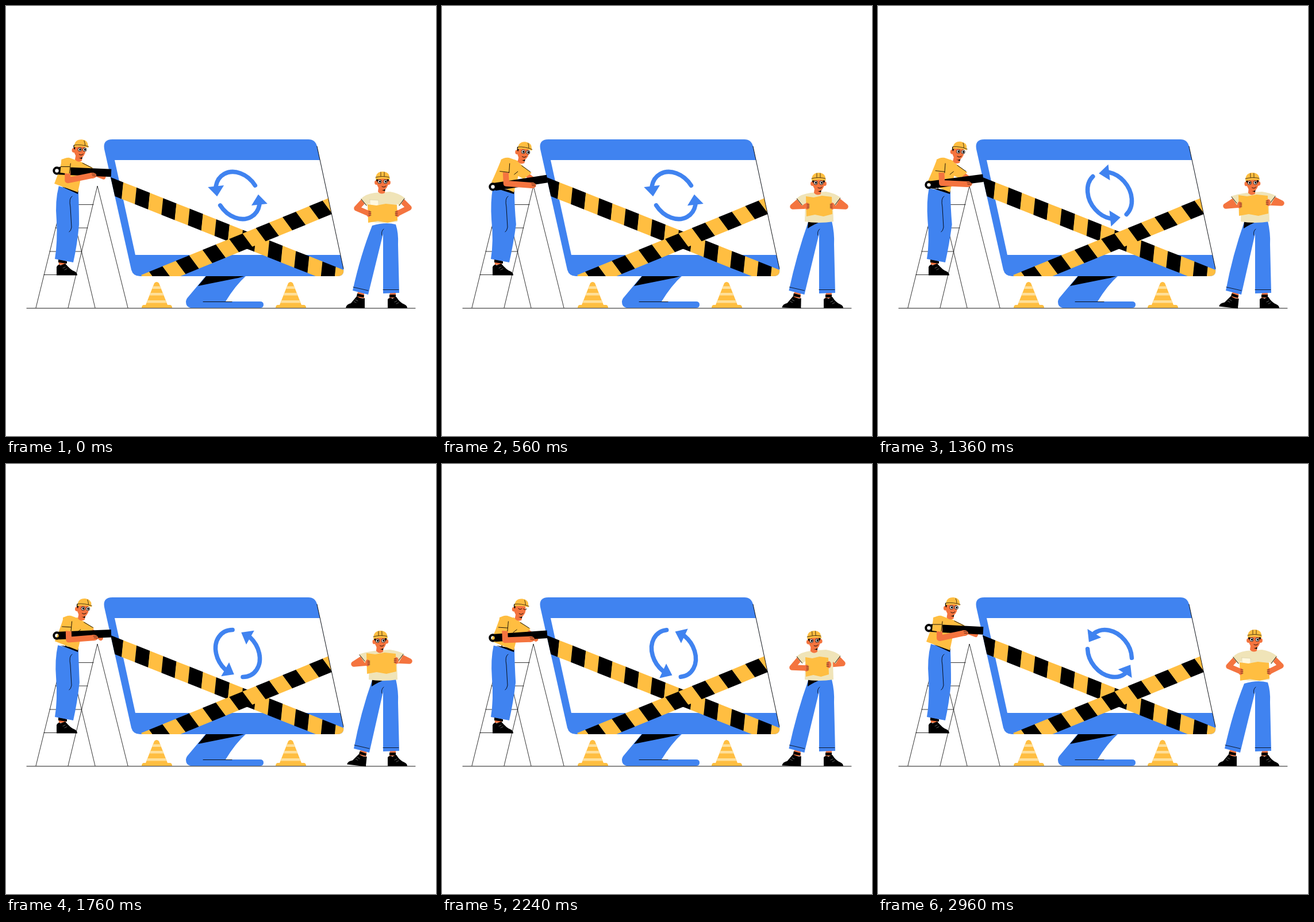
Recreate the animation shown at these times as an HTML page with a canvas. Size 748 px wide and 748 px high, loop 3040 ms.

```html
<!DOCTYPE html>
<html>
<head>
<meta charset="utf-8">
<style>
html, body { margin: 0; height: 100%; overflow: hidden; background: #fff; }
canvas { display: block; }
</style>
</head>
<body>
<canvas id="stage" width="748" height="748"></canvas>
<script>
const ctx = document.getElementById('stage').getContext('2d');
const BLUE = '#4083f0', YELLOW = '#ffbe41', PALE = '#ffe09a', CREAM = '#f0e4b8',
      SKIN = '#f4743f', INK = '#000', WHITE = '#fff', TAU = Math.PI * 2;
const MONITOR = 'M185 232H526Q538 232 541 244L587 457Q589 470 576 470H233Q221 470 218 459L171 249Q168 232 185 232Z';
const LOOP = 3040;

const mix = (a, b, q) => a + (b - a) * q;

function fill(d, color) {
  ctx.fillStyle = color;
  ctx.fill(new Path2D(d));
}
function line(d, color = INK, width = 0.9) {
  ctx.strokeStyle = color;
  ctx.lineWidth = width;
  ctx.stroke(new Path2D(d));
}
function oval(x, y, rx, ry, color) {
  ctx.fillStyle = color;
  ctx.beginPath();
  ctx.ellipse(x, y, rx, ry, 0, 0, TAU);
  ctx.fill();
}

// Barrier tape: starts at (x, y) on its top edge; (dx, dy) leads to the bottom edge.
function tape(x, y, end, slope, dx, dy, firstWidth, step, black) {
  let right = x + firstWidth;
  while (x < end) {
    right = Math.min(right, end);
    const y2 = y + (right - x) * slope;
    fill(`M${x} ${y}L${right + 0.3} ${y2}l${dx} ${dy}L${x + dx} ${y + dy}Z`, black ? INK : YELLOW);
    x = right;
    y = y2;
    right += step;
    black = !black;
  }
}

// Two arrows chase each other round a slanted circle; the heads keep their shape.
function arrows(turn) {
  const rad = Math.PI / 180, { sin, cos } = Math;
  for (const a of [157 * rad + turn, 337 * rad + turn]) {
    ctx.strokeStyle = BLUE;
    ctx.lineWidth = 7.5;
    ctx.save();
    ctx.transform(0.915, 0, 0.21, 1, 403, 329.5);
    ctx.beginPath();
    ctx.arc(0, 0, 41, 132 * rad - a, -a, true);
    ctx.restore();
    ctx.stroke();

    const b = a + 17 * rad;
    ctx.save();
    ctx.translate(403 + 37.5 * cos(a) - 8.6 * sin(a), 329.5 - 41 * sin(a));
    ctx.rotate(Math.atan2(-41 * cos(b), -37.5 * sin(b) - 8.6 * cos(b)));
    fill('M0 -14L18 0L0 14Z', BLUE);
    ctx.restore();
  }
}

function cone(x) {
  ctx.save();
  ctx.translate(x, 0);
  fill('M-4 482Q0 478 4 482L19 520H24Q27 521 27 525H-26Q-26 521 -23 520H-19Z', YELLOW);
  for (const [y, w] of [[487.5, 6.3], [499, 10.7], [512, 15.7]])
    fill(`M${-w} ${y}H${w}l1.7 4.4H${-w - 1.7}Z`, PALE);
  ctx.restore();
}

function scenery(turn) {
  line('M36 525.8H712');
  line('M52 525L104 315M108 525L159 313L212 525M155 525L104 313M66 467.5H123M76 427H132M86 386H142M96 345.5H152', INK, 0.8);

  fill('M348 469H418Q399 486 382 514H442Q448 514 448 519.5T442 525H321Q313 523 313 515Q313 510 317 506Z', BLUE);
  fill('M349 469H418L404 473L334 487Z', INK);
  line('M343 514.5H393');
  cone(262);
  cone(495);

  fill(MONITOR, BLUE);
  fill('M189 268H546L582 433H225Z', WHITE);
  arrows(turn);
  ctx.save();
  ctx.clip(new Path2D(MONITOR));
  tape(181, 297.5, 600, 0.398, -3, 29, 23, 23.1, true);
  tape(235, 468, 575, -0.41, 17, 23, 14, 23.2, false);
  ctx.restore();
  line('M541 244L587 457', INK, 0.9);
}

// Head in a hard hat; the origin is the middle of the hat.
function head(x, y, tilt, side, blink) {
  ctx.save();
  ctx.translate(x, y);
  ctx.rotate(tilt);
  const f = side ? -2 : 0;
  fill(`M${f - 6} 14L${f + 5} 18L${f + 4} 30Q${f - 3} 34 ${f - 8} 28Z`, SKIN);
  fill(`M${f - 4} 24Q${f} 26 ${f + 5} 23L${f + 4} 27Z`, INK);
  oval(f - 10.5, 12, 3.4, 4, SKIN);
  if (!side) oval(10.5, 12, 3.4, 4, SKIN);
  oval(f, 12, 10, 13, SKIN);
  fill(`M${f - 11} 3H${f - 5}L${f - 8} 7L${f - 9} 11Q${f - 12} 8 ${f - 11} 3Z`, INK);
  if (!side) fill('M11 3H7L9 11Q12 8 11 3Z', INK);
  for (const ex of side ? [-2, 6.5] : [-5, 5]) {
    if (blink) line(`M${ex - 3} 10Q${ex} 13 ${ex + 3} 10`, INK, 0.9);
    else {
      oval(ex, 10.5, 3.4, 3.4, INK);
      oval(ex, 10.5, 2.7, 2.7, WHITE);
      oval(ex + 0.4, 10.5, 1.7, 1.8, INK);
    }
  }
  line(`M${f - 1} 19Q${f + 3} 21.5 ${f + 6} 18`, INK, 0.9);
  fill('M-12 6Q-12 -7 1 -7Q12 -6 12 3L13 7Q0 4 -12 7Z', YELLOW);
  line(side ? 'M-12 3Q0 1 13 5M5 -5Q7 -1 7 3' : 'M-12 3Q0 0 12 3M-3 -6V1M3 -6V1', INK, 0.7);
  ctx.restore();
}

function climber(k) {
  const q = (1 - Math.cos((k + 0.7) / 10 * TAU)) / 2;
  const m = (a, b) => mix(a, b, q);
  const wheelY = m(285, 316);

  // shoes and trousers
  fill('M91 438L105 442L104 450H92Z', SKIN);
  fill('M91 440L106 444V448L91 446Z', INK);
  fill('M88 468V454Q91 448 95 451L103 448Q113 460 120 462Q124 464 124 468.5H88Z', INK);
  line('M99 456l4 -2M102 459l4 -2', WHITE, 0.4);
  fill(`M${m(92, 88)} ${m(313, 318)}L126 324Q${m(127, 126)} 350 ${m(127, 129)} 380Q124 415 117 446L85 440Q90 410 ${m(88, 86)} 372Q${m(85, 84)} 340 ${m(92, 88)} ${m(313, 318)}Z`, BLUE);
  fill(`M${m(97, 92)} ${m(314, 317)}L126 321L125 327Z`, INK);
  line('M115 331Q109 334 112 350L114 385Q113 391 110 393', INK, 0.9);

  // far arm, head, shirt
  line(`M${m(140, 143)} ${m(282, 290)}L${m(157, 158)} ${m(292, 302)}L${m(170, 158)} ${m(297, 311)}`, SKIN, 8);
  fill(`M${m(120, 127)} ${m(266, 267)}L${m(151, 156)} ${m(281, 291)}L${m(143, 142)} ${m(294, 301)}L${m(118, 122)} 290Z`, YELLOW);
  fill(`M${m(97, 103)} ${m(270, 268)}Q${m(101, 108)} 263 ${m(110, 117)} 264L${m(126, 134)} 270Q${m(132, 136)} 290 129 ${m(305, 309)}L125 324L${m(84, 86)} ${m(309, 307)}Q${m(92, 94)} 290 ${m(97, 103)} ${m(270, 268)}Z`, YELLOW);
  head(m(130, 145), m(239, 243.5), m(0.02, 0.1), true, k === 22);
  line(`M${m(133, 139)} ${m(273, 278)}L${m(149, 154)} ${m(281, 289)}M${m(121, 126)} 293L${m(128, 132)} 288`, INK, 0.9);

  // rolled tape
  ctx.lineCap = 'butt';
  line(`M92 ${wheelY}L183 ${m(290, 301)}`, INK, 13.5);
  ctx.lineCap = 'round';
  ctx.strokeStyle = INK;
  ctx.lineWidth = 4;
  ctx.beginPath();
  ctx.arc(88.5, wheelY, 5.2, 0, TAU);
  ctx.stroke();

  // near arm
  const elbowX = m(107, 112), elbowY = m(303, 309), handX = m(149, 156), handY = m(294, 313);
  line(`M${m(107, 111)} ${m(286, 288)}L${elbowX} ${elbowY}L${handX} ${handY}`, SKIN, 10);
  oval(handX + 1, handY, 7, 5, SKIN);
  line(`M${handX} ${handY - 3}l6 1M${handX + 1} ${handY}l6 1`, INK, 0.6);
  fill(`M${m(96, 103)} ${m(267, 267)}Q${m(108, 112)} 262 ${m(113, 119)} 272L${m(111, 117)} ${m(292, 290)}L${m(94, 103)} ${m(290, 289)}Z`, YELLOW);
  line(`M${m(112, 118)} 274L${m(110, 117)} ${m(291, 290)}M${m(95, 101)} ${m(279, 288)}L${m(110, 117)} ${m(279, 290)}`, INK, 0.9);
}

// hat, left elbow, left hand, right elbow, right hand, map top and bottom, lift
const REST = [655, 295, 607, 352, 631, 361, 703, 351, 681, 361, 345, 377, 0];
const READ = [655, 297, 607, 349, 635, 348, 704, 349, 679, 348, 331, 366, 0.2];
const HIGH = [651, 297, 602, 348, 629, 346, 704, 343, 679, 342, 329, 365, 1];
const LOW = [647, 297, 606, 354, 634, 355, 699, 347, 673, 349, 336, 370, 0.2];
const KEYS = [[0, REST], [3, REST], [5, READ], [8, HIGH], [19, HIGH], [22, LOW], [26, REST], [30, REST]];

function pose(k) {
  const i = KEYS.findIndex(([at]) => at > k);
  const [t0, a] = KEYS[i - 1], [t1, b] = KEYS[i];
  const q = (k - t0) / (t1 - t0), ease = q * q * (3 - 2 * q);
  return a.map((v, j) => mix(v, b[j], ease));
}

function reader(k) {
  const [hx, hy, lex, ley, lhx, lhy, rex, rey, rhx, rhy, top, low, lift] = pose(k);
  const s = 2 * lift;
  const open = Math.min(1, (377 - low) / 8);

  // shoes and trousers
  ctx.save();
  ctx.translate(618, 525);
  ctx.rotate(lift * 0.1);
  ctx.translate(-618 + s, -525);
  fill('M612 497L623 500V508H610Z', SKIN);
  fill('M611 500L623 503L622 507L610 505Z', INK);
  fill('M591 525Q592 519 600 517L610 505Q617 510 624 508V525.5Z', INK);
  line('M605 514l4 2M608 511l4 2', WHITE, 0.4);
  ctx.restore();
  fill('M668 497H678V508H667Z', SKIN);
  fill('M667 502H678V507H667Z', INK);
  fill('M664 525.5V510Q668 506 672 509L679 506Q685 516 693 519Q698 521 698 525.5Z', INK);
  line('M676 515l4 -2M679 518l4 -2', WHITE, 0.4);
  const waist = mix(382, 376, open);
  fill(`M637 ${waist}Q660 ${waist - 7} 678 ${waist - 2}Q683 395 682 415L684 499L656 500V396L${630 + s} 502L${603 + s} 495Q617 432 637 ${waist}Z`, BLUE);
  if (open > 0.3) fill('M637 375H660Q648 379 636 387Z', INK);
  line(`M657 388Q652 392 654 399M${604 + s} 489L${630 + s} 495M656 493.5H683`, INK, 0.8);

  // arms, shirt and head
  line(`M622 ${339 - s}L${lex + 3} ${ley}L${lhx} ${lhy}`, SKIN, 9.5);
  line(`M688 ${338 - s}L${rex - 2} ${rey}L${rhx} ${rhy}`, SKIN, 9.5);
  const sx = 617 - 1.5 * s, rx = 694 - s;
  fill(`M641 325Q625 327 ${sx} ${336 - 2.5 * s}L${sx + 10} ${348 - s}L632 343L631 375Q655 379 681 375L680 344L${rx - 9} ${348 - s}L${rx} ${334 - 2 * s}Q682 325 668 323Z`, CREAM);
  line(`M${sx + 1} ${336 - 2 * s}l9 11M${rx - 1} ${335 - 2 * s}l-9 12`, INK, 0.9);
  head(hx, hy, (hx - 655) * 0.008, false, k === 9);

  // map
  if (open < 0.4) {
    fill('M633 337L648 338L649 348H632Z', '#fff8de');
    line('M633 337L648 338V346M633 337V346', '#d9cfa6', 0.7);
  }
  const l = lhx - 2, r = rhx - 1, w = r - l;
  fill(`M${l} ${top}L${l + w * 0.3} ${top + 2}L${l + w * 0.62} ${top - 1}L${r} ${top + 1}L${r + 1} ${low - 4}L${l + w * 0.68} ${low}L${l + w * 0.35} ${low - 3}L${l + 1} ${low}Z`, YELLOW);
  for (const [x, y, d] of [[lhx, lhy, 1], [rhx, rhy, -1]]) {
    oval(x, y, 4, 6, SKIN);
    for (const dy of [-3, 0, 3]) line(`M${x} ${y + dy}h${4 * d}`, INK, 0.6);
  }
}

function draw(now) {
  const t = now % LOOP;
  // ten poses a second, shown on an 80 ms grid
  const k = Math.floor(Math.floor(t / 80) * 0.8);
  // one revolution a second, held back a little in mid-loop
  const lag = 0.13 * Math.sin(Math.PI * k / 30) ** 6;
  ctx.fillStyle = WHITE;
  ctx.fillRect(0, 0, 748, 748);
  ctx.lineCap = ctx.lineJoin = 'round';
  scenery(k / 10 * TAU - lag);
  climber(k);
  reader(k);
}

let start;
function tick(now) {
  start ??= now;
  draw(now - start);
  requestAnimationFrame(tick);
}
requestAnimationFrame(tick);
</script>
</body>
</html>
```
